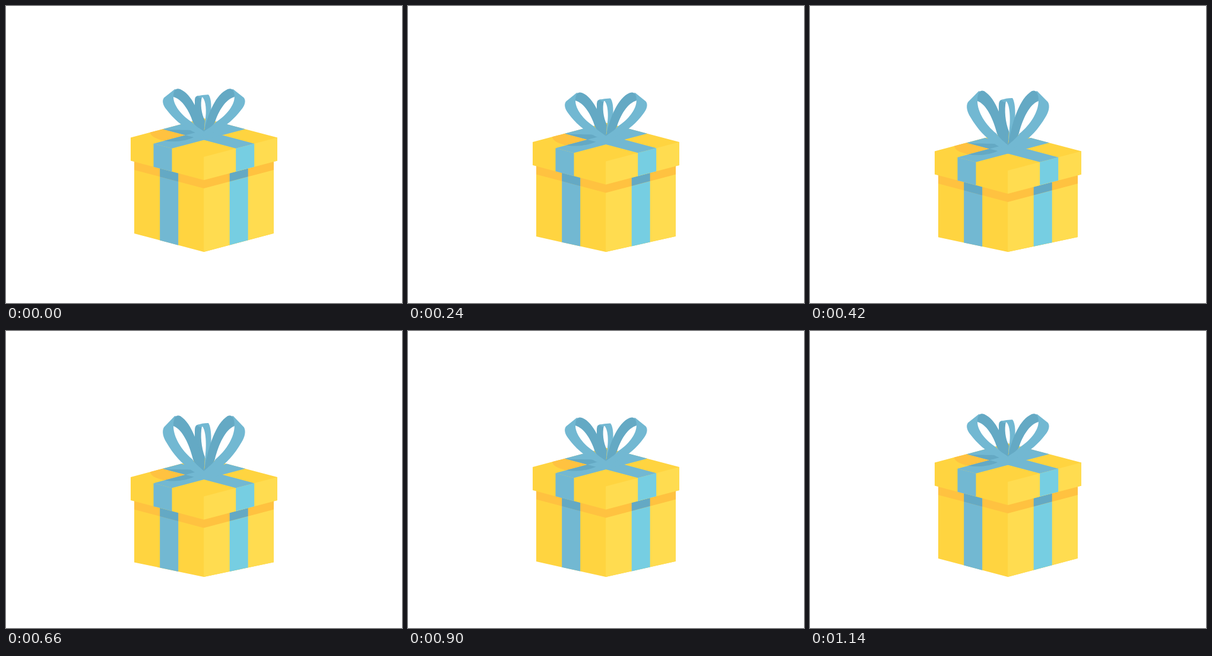
An HTML page for the animation above (1.2 s loop, 667 by 500 pixels).

```html
<!DOCTYPE html>
<html lang="en">
<head>
<meta charset="utf-8">
<title>Gift box</title>
<style>
  html, body { margin: 0; width: 100%; height: 100%; overflow: hidden; background: #fff; }
  svg { display: block; width: 667px; height: 500px; }
  .yellow { fill: #ffd440; }
  .pale { fill: #ffdc50; }
  .amber { fill: #ffc240; }
  .blue { fill: #72b8d2; }
  .deep { fill: #64a9c4; }
  .cyan { fill: #76cee2; }
</style>
</head>
<body>
<svg viewBox="0 0 667 500">
  <defs>
    <clipPath id="cross">
      <path d="M264 207.3 295 199.1 418.2 231.7 387.2 239.8Z M403 207.3 372 199.1 248.5 231.7 279.5 239.8Z"/>
    </clipPath>
    <path id="shade" d="M243 212.8 264 207.3C278 210 304 207 328 211C322 222 300 229 275 228C258 226 244 221 243 212.8Z"/>
    <g id="loop">
      <path class="deep" d="M281 145Q288 135.5 297 142C316 153 328 186 333.4 212L326 211C321 205 317 200 315 196C309 177 297 157 282 153Z"/>
      <path class="blue" d="M284 140.2 266 154.5C262 160 265 168 270 174C282 190 296 202 314 211L333.4 220V211C324 205 318 201 314 196C295 184 282 167 282 153Q281.5 145 286 139.8Z"/>
    </g>
  </defs>

  <g id="body">
    <path class="yellow" d="M216 235 333.2 250 451 235V382.7L333.2 414 216 383Z"/>
    <path class="pale" d="M333.2 250 451 235V382.7L333.2 414Z"/>
    <path class="blue" d="M259.2 241H290.2V402.7L259.2 394.5Z"/>
    <path class="cyan" d="M376.7 241H407.7V394.2L376.7 402.5Z"/>
  </g>

  <g id="lid">
    <path class="amber" d="M216 255H451V276L333.2 307 216 276Z"/>
    <path class="deep" d="M259.2 255H290.2V295.7L259.2 287.5Z M376.7 255H407.7V287.3L376.7 295.5Z"/>
    <path class="yellow" d="M210 221.5 333.2 189 457 221.5V260.5L333.2 293 210 260.5Z"/>
    <path class="pale" d="M333.2 254 457 221.5V260.5L333.2 293Z"/>
    <use href="#shade" class="amber"/>
    <path class="blue" d="M264 207.3 295 199.1 418.2 231.7 387.2 239.8Z"/>
    <path class="blue" d="M403 207.3 372 199.1 248.5 231.7 279.5 239.8Z"/>
    <use href="#shade" class="deep" clip-path="url(#cross)"/>
    <path class="blue" d="M248.5 231.7 279.5 239.8V278.8L248.5 270.7Z"/>
    <path class="cyan" d="M387.2 239.8 418.2 231.7V270.7L387.2 278.8Z"/>
  </g>

  <g id="bow">
    <path class="deep" d="M318 158Q318 151.5 324 151L330 153C327 165 329 181 335 193L333.4 213C323 201 317 180 318 158Z"/>
    <path class="blue" d="M321 151.8Q332 149 341 149.2C347 156 347 180 342 194L334 206 335.5 193C338 177 337 160 331 153.5L328 155Z"/>
    <use href="#loop"/>
    <use href="#loop" transform="translate(666.8 0) scale(-1 1)"/>
  </g>
</svg>
<script>
  const STEP = 60, LOOP = 1200, BASE = 211, FLOOR = 414;
  // Progress of the two overlapping phases, one entry per step.
  const settle = [0, .4, .8, .97, 1, 1, 1, 1, 1, 1];
  const squash = [0, 0, 0, 0, .067, .37, .66, .89, .97, 1];

  const part = id => document.getElementById(id);
  const [body, lid, bow] = ["body", "lid", "bow"].map(part);

  const scaleY = (s, y) => `translate(0 ${y}) scale(1 ${s}) translate(0 ${-y})`;

  function pose(k) {
    const a = settle[k], b = squash[k];
    const drop = 6.25 * a + 18.75 * b;
    body.setAttribute("transform", scaleY(1 - (5 * a + 1.5 * b) / 31, FLOOR));
    lid.setAttribute("transform", `translate(0 ${drop})`);
    bow.setAttribute("transform", `translate(0 ${drop}) ${scaleY(1 + 22.3 * b / 72, BASE)}`);
  }

  const start = performance.now();
  function draw() {
    const i = Math.floor(((performance.now() - start) % LOOP) / STEP);
    pose(i < 10 ? i : 19 - i);
    requestAnimationFrame(draw);
  }
  draw();
</script>
</body>
</html>
```
